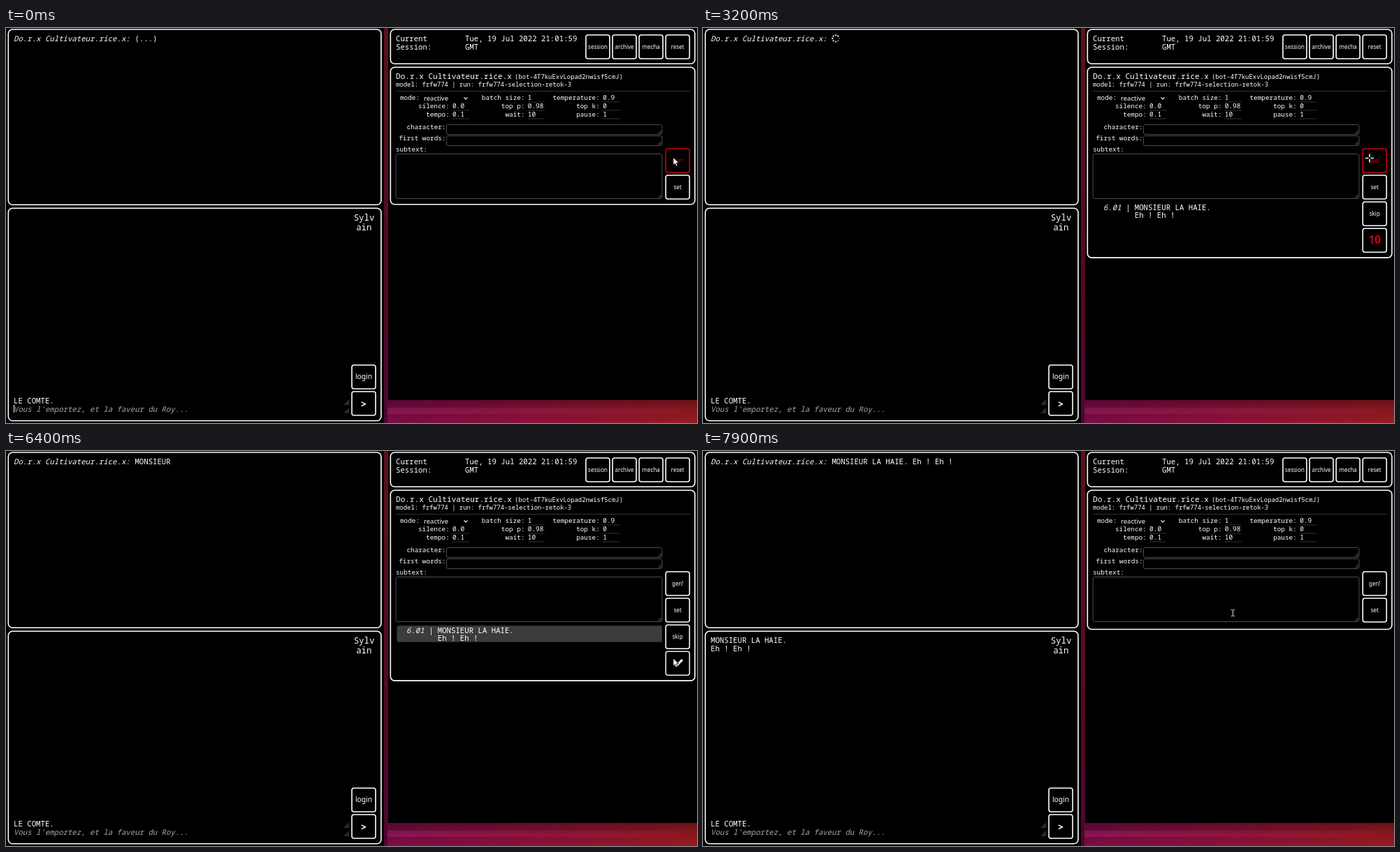
Animation, 989 px wide and 566 px high, one loop 8000 ms. Source, as an HTML page:

```html
<!DOCTYPE html>
<html lang="fr">
<head>
<meta charset="utf-8">
<title>Session</title>
<style>
html, body { margin: 0; width: 100%; height: 100%; overflow: hidden; background: #000; }
svg { display: block; width: 989px; height: 566px; }
text { fill: #fff; font-family: "Noto Sans Mono", monospace; white-space: pre; }
.sans { font-family: "Noto Sans", sans-serif; }
.it { font-style: italic; }
.frame { fill: #000; stroke: #fff; stroke-width: 1.6; }
.field { fill: #000; stroke: #4c4c4c; }
.rule { stroke: #333; }
.grip { fill: #2a2a2a; }
</style>
</head>
<body>
<svg id="stage" viewBox="0 0 989 566"></svg>
<script>
const LOOP = 8000;
const NAME = 'Do.r.x Cultivateur.rice.x';
const ROLE = 'MONSIEUR LA HAIE.';
const REPLY = 'Eh ! Eh !';
const MONO = 10.7;
const RED = [196, 0, 22], SALMON = [226, 150, 118], WHITE = [255, 255, 255];

const text = (x, y, size, str, attrs = '') =>
  `<text x="${x}" y="${y}" font-size="${size}" ${attrs}>${str}</text>`;
const right = (x, y, str) => text(x, y, 9.35, str, 'text-anchor="end"');
const frame = (x, y, w, h, r, attrs = '') =>
  `<rect class="frame" x="${x}" y="${y}" width="${w}" height="${h}" rx="${r}" ${attrs}/>`;
const button = (x, y, label, size = 8, id = '') =>
  `<g id="${id}">${frame(x, y, 34, 34, 3)}` +
  text(x + 17, y + 17 + size * 0.33, size, label, 'class="sans" text-anchor="middle"') + '</g>';
const grip = (x, y, s = 6) => `<path class="grip" d="M${x} ${y}v${-s}l${-s} ${s}z"/>`;
const field = (x, y, w, h) =>
  `<rect class="field" x="${x}" y="${y}" width="${w}" height="${h}" rx="2.5"/>` + grip(x + w - 1, y + h - 1);
const rule = (x, y, w) => `<path class="rule" d="M${x} ${y}h${w}"/>`;

const column = (labelX, x, rows) => rows.map(([label, value], i) => {
  const y = 102.5 + i * 12;
  if (!label) return '';
  return right(labelX, y, label) + text(x, y, 9.5, value) + rule(x, y + 3.5, 24.5);
}).join('');

const wallpaper = `
  <defs>
    <linearGradient id="wall"><stop stop-color="#7a0b46"/><stop offset=".45" stop-color="#8c103b"/>
      <stop offset="1" stop-color="#981a20"/></linearGradient>
    <linearGradient id="shade" x2="0" y2="1"><stop stop-opacity=".3"/><stop offset=".5" stop-opacity=".1"/>
      <stop offset="1" stop-opacity="0"/></linearGradient>
    <linearGradient id="gap" x2="0" y2="1"><stop stop-color="#59121d"/><stop offset=".5" stop-color="#550b1f"/>
      <stop offset="1" stop-color="#4c0730"/></linearGradient>
    <linearGradient id="beam"><stop stop-color="#c02a78" stop-opacity=".4"/><stop offset="1" stop-color="#c03040" stop-opacity=".15"/></linearGradient>
    <clipPath id="fold"><rect id="foldBox" x="545" y="246" width="445" height="82"/></clipPath>
  </defs>
  <rect x="541" width="6" height="566" fill="url(#gap)"/>
  <rect x="546" y="533" width="443" height="33" fill="url(#wall)"/>
  <rect x="546" y="544" width="418" height="9" fill="url(#beam)"/>
  <path d="M556 566L610 533M650 533L700 566M742 566L790 533M880 533L925 566" stroke="#d04070" stroke-opacity=".18"/>
  <rect x="546" y="533" width="443" height="33" fill="url(#shade)"/>`;

const left = frame(3.3, 2, 533.6, 251.2, 6) + frame(3.3, 258.3, 533.6, 304.4, 6) +
  text(11, 19, MONO, NAME + ':', 'class="it"') +
  text(184.4, 19, MONO, '', 'id="speech"') + '<g id="loader" fill="#fff"></g>' +
  text(512.5, 276, 12.4, 'Sylv', 'text-anchor="middle"') +
  text(512.3, 290, 12.4, 'ain', 'text-anchor="middle"') +
  `<g id="chat">${text(11, 275, MONO, ROLE)}${text(11, 286.5, MONO, REPLY)}</g>` +
  text(11, 537.5, MONO, 'LE COMTE.') +
  text(11, 549.5, MONO, "Vous l'emportez, et la faveur du Roy...", 'class="it" style="fill:#a9a9a9"') +
  '<path id="caret" d="M11.5 540v11" stroke="#fff"/>' +
  grip(491, 540, 8) + grip(491, 552, 8) +
  button(495, 483, 'login', 10.3) + frame(495, 521, 34, 34, 3) +
  text(512, 543.8, 15, '&gt;', 'text-anchor="middle" font-weight="600"');

const header = frame(550.3, 2, 435.7, 49.3, 6) +
  text(558, 19, MONO, 'Current') + text(558, 30.5, MONO, 'Session:') +
  text(657, 19, MONO, 'Tue, 19 Jul 2022 21:01:59') + text(657, 30.5, MONO, 'GMT') +
  ['session', 'archive', 'mecha', 'reset'].map((s, i) => button(830 + i * 38.1, 10, s)).join('');

const panel = frame(550.3, 56.3, 435.7, 196.4, 6, 'id="panel"') +
  text(558, 73, 11.07, NAME, 'font-weight="500"') +
  text(728, 73, 8.92, '(bot-4T7kuExvLopad2nwisf5cmJ)') +
  text(558, 84.3, 8.92, 'model: frfw774 | run: frfw774-selection-retok-3') +
  rule(558, 90.5, 421) + right(592, 102.5, 'mode:') +
  text(598, 103.5, 9.5, 'reactive', 'class="sans"') +
  '<path d="M655.5 99.3l2.5 2.6 2.5-2.6" fill="none" stroke="#fff" stroke-width="1.2"/>' +
  column(634.8, 639, [[], ['silence:', '0.0'], ['tempo:', '0.1']]) +
  column(742.5, 746.7, [['batch size:', '1'], ['top p:', '0.98'], ['wait:', '10']]) +
  column(849.8, 854.2, [['temperature:', '0.9'], ['top k:', '0'], ['pause:', '1']]) +
  right(629.5, 145, 'character:') + right(629.5, 161, 'first words:') + text(558, 177, 9.35, 'subtext:') +
  field(630.5, 138.5, 308.5, 14) + field(630.5, 154.5, 308.5, 14) + field(558, 180.5, 381, 64) +
  button(944.3, 173, 'gen!', 8, 'gen') + button(944.3, 211, 'set', 8, 'set') +
  `<g id="result" clip-path="url(#fold)">
    <rect id="mark" x="559.5" y="250.3" width="379.5" height="23.4" rx="2" fill="#4a4a4a"/>
    ${text(573, 260.5, MONO, '6.01', 'class="it"')}${text(605.2, 260.5, MONO, '|')}
    ${text(617.8, 260.5, MONO, ROLE)}${text(617.8, 272, MONO, REPLY)}
    ${button(944.3, 249.2, 'skip', 8, 'skip')}${button(944.3, 287.3, '', 15.5, 'count')}
    <path id="check" d="M955.5 303.5l4 4.5 8.5-9" fill="none" stroke="#fff" stroke-width="3.2"/>
  </g>`;

const pointers = `<g id="pointer">
  <path id="arrow" d="M0 0v11l2.6-2.4 1.8 3.9 1.9-.9-1.8-3.8h3.5z" fill="#fff" stroke="#000" stroke-width=".8"/>
  <g id="cross" fill="none"><path d="M-6 0h4.5M1.5 0h4.5M0-6v4.5M0 1.5v4.5" stroke="#000" stroke-width="3"/>
    <path d="M-6 0h4.5M1.5 0h4.5M0-6v4.5M0 1.5v4.5" stroke="#fff" stroke-width="1.6"/></g>
  <path id="beamPtr" d="M-2.5-4.5h1.7l.8.6.8-.6h1.7M0-4v8M-2.5 4.5h1.7l.8-.6.8.6h1.7" fill="none" stroke="#ddd"/>
</g>`;

document.getElementById('stage').innerHTML = wallpaper + left + header + panel + pointers;

const el = id => document.getElementById(id);
const show = (id, on) => { el(id).style.display = on ? '' : 'none'; };
const clamp = v => Math.min(1, Math.max(0, v));
const swing = (t, from, to) => 0.5 - Math.cos(clamp((t - from) / (to - from)) * Math.PI) / 2;

el('loader').innerHTML = Array.from({ length: 8 }, (_, i) =>
  `<circle cx="${190 + 4.7 * Math.cos(i * Math.PI / 4)}" cy="${15 + 4.7 * Math.sin(i * Math.PI / 4)}" r="1.15"/>`).join('');
const dots = [...el('loader').children];

const words = `${ROLE.slice(0, -1)} . ${REPLY}`.split(' ');
const speech = t => {
  if (t < 2000) return '(...)';
  const n = Math.floor((t - 6400) / 100) + 1;
  return n < 1 ? '' : words.slice(0, n).join(' ').replace(' .', '.');
};

const PATH = [[0, 955, 185.5], [1900, 955, 185.5], [2600, 954, 186.5], [5000, 954, 186.5],
  [5600, 954.5, 294.5], [5800, 955, 297], [7300, 955, 297], [7700, 758.5, 232], [LOOP, 758.5, 232]];
function position(t) {
  const i = PATH.findIndex(p => p[0] > t);
  const [t0, x0, y0] = PATH[i - 1], [t1, x1, y1] = PATH[i];
  const k = (t - t0) / (t1 - t0);
  return [x0 + (x1 - x0) * k, y0 + (y1 - y0) * k];
}

function tint(id, color, k, label = true) {
  const c = `rgb(${WHITE.map((w, i) => Math.round(w + (color[i] - w) * k))})`;
  el(id).querySelector('rect').style.stroke = c;
  if (label) el(id).querySelector('text').style.fill = c;
}
// Hover level: on at once, then a short fade after leaving.
const hover = (t, from, to) => t < from ? 0 : 1 - clamp((t - to) / 200);

function render(t) {
  const [x, y] = position(t);
  const shape = t < 500 || (t >= 6300 && t < 7450) ? 'arrow' : t < 7450 ? 'cross' : 'beamPtr';
  el('pointer').setAttribute('transform', `translate(${x} ${y})`);
  ['arrow', 'cross', 'beamPtr'].forEach(id => show(id, id === shape));

  show('caret', t < 800);
  show('chat', t >= 7400);
  el('speech').textContent = speech(t);
  show('loader', t >= 2000 && t < 6400);
  const step = Math.floor(t / 100);
  dots.forEach((d, i) => d.setAttribute('opacity', clamp(0.3 + ((i - step % 8 + 8) % 8) / 4)));

  const open = swing(t, 2800, 3150) - swing(t, 7550, 7950);
  el('panel').setAttribute('height', 196.4 + 76.4 * open);
  el('foldBox').setAttribute('height', 5 + 76.4 * open);
  show('result', t >= 2800 && t < 7450);
  show('mark', t >= 6300);
  el('mark').setAttribute('opacity', 0.82 + 0.18 * clamp((t - 6700) / 500));

  const done = t >= 6300;
  show('check', done);
  const label = el('count').querySelector('text');
  label.textContent = done ? '' : 10 - Math.max(0, Math.floor((t - 2900) / 1000));
  label.style.fill = `rgb(${RED})`;
  label.style.fontWeight = 600;
  tint('gen', RED, t < 5120 ? 1 : 0);
  tint('set', SALMON, hover(t, 5140, 5320));
  tint('skip', SALMON, hover(t, 5350, 5580));
  tint('count', SALMON, hover(t, 5560, 6250), false);
}

function tick() {
  render(performance.now() % LOOP);
  requestAnimationFrame(tick);
}
tick();
</script>
</body>
</html>
```
